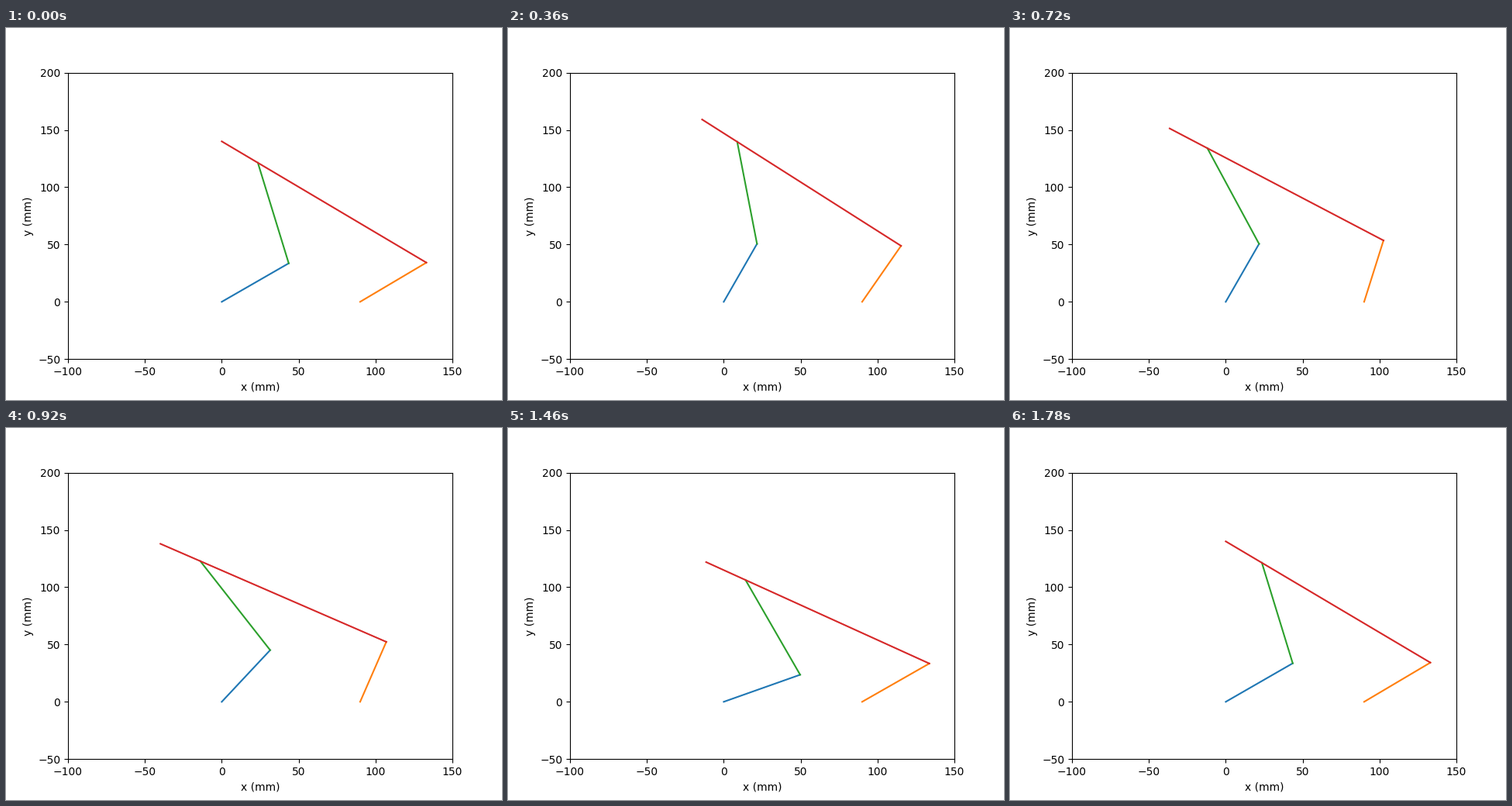
Write a matplotlib script that moves like this. It is 640x480 px and loops after 1.8 s.

```python
import numpy as np
import matplotlib.pyplot as plt
from matplotlib.animation import FuncAnimation

FRAMES = 90
CRANK = 55          # both driven arms
COUPLER = 90        # left arm to long bar
BAR = 170           # right arm to pen
PEN_OFFSET = 30     # pen to coupler joint
LEFT = np.array([0.0, 0.0])
RIGHT = np.array([90.0, 0.0])
CENTRE = np.array([-20.0, 140.0])
RADIUS = 20


def elbow(base, end, r1, r2):
    """Right-hand meeting point of two links spanning base to end."""
    d = np.hypot(*(end - base))
    u = (end - base) / d
    a = (r1**2 - r2**2 + d**2) / (2 * d)
    h = np.sqrt(r1**2 - a**2)
    return base + a * u + h * np.array([u[1], -u[0]])


def links(angle):
    pen = CENTRE + RADIUS * np.array([np.cos(angle), np.sin(angle)])
    right = elbow(RIGHT, pen, CRANK, BAR)
    joint = pen + (right - pen) * PEN_OFFSET / BAR
    left = elbow(LEFT, joint, CRANK, COUPLER)
    return (LEFT, left), (RIGHT, right), (left, joint), (right, pen)


fig, ax = plt.subplots(figsize=(6.4, 4.8), dpi=100)
ax.set(xlim=(-100, 150), ylim=(-50, 200), xlabel="x (mm)", ylabel="y (mm)")
lines = [ax.plot([], [], color=f"C{i}")[0] for i in range(4)]

# Both ends of the turn are included, so the pose rests for one step.
angles = np.linspace(0, 2 * np.pi, FRAMES)


def update(i):
    for line, ends in zip(lines, links(angles[i])):
        line.set_data(*np.transpose(ends))
    return lines


anim = FuncAnimation(fig, update, frames=FRAMES, interval=20,
                     init_func=lambda: update(0), repeat=True, repeat_delay=0)
plt.show()
```
